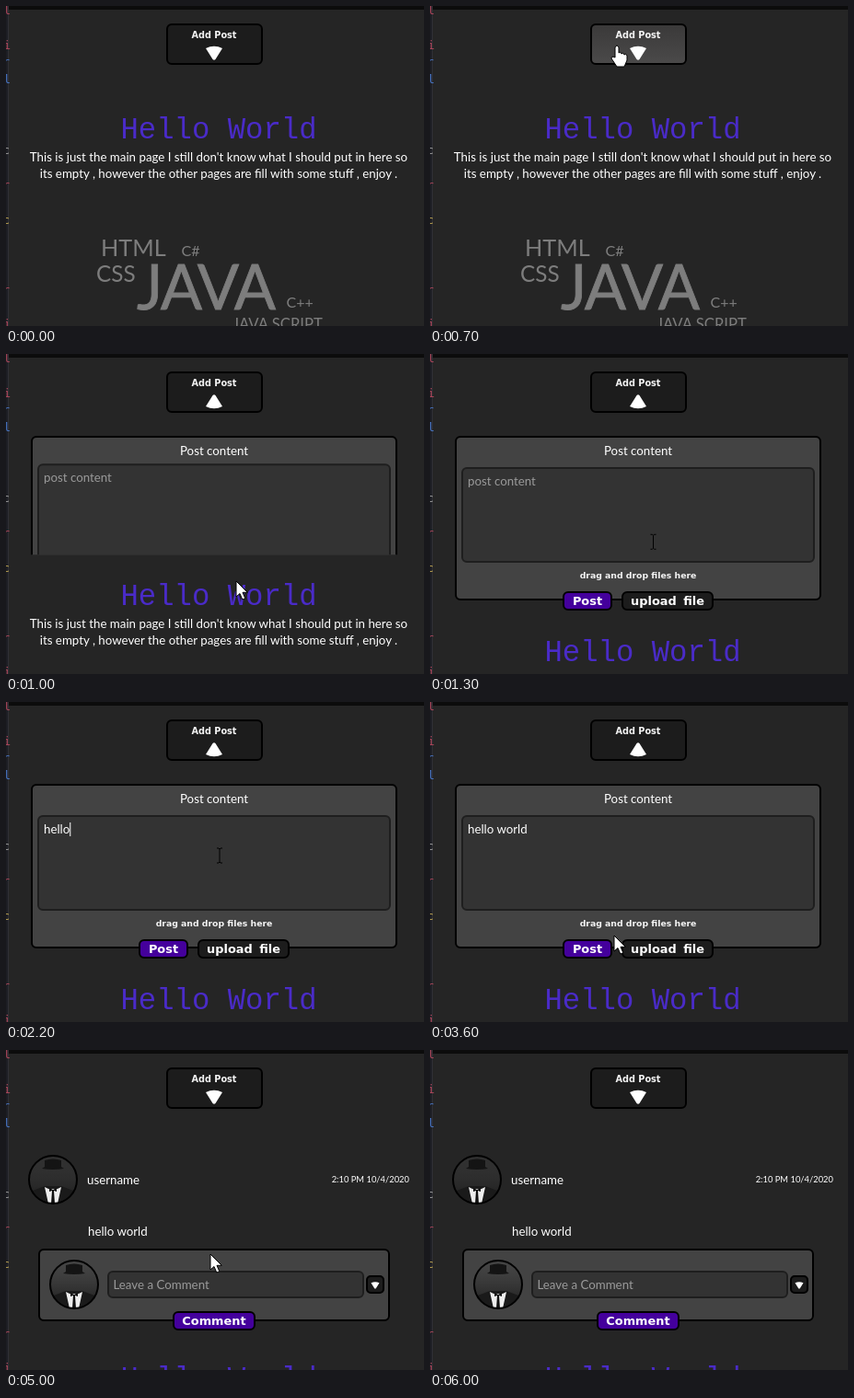
These frames come from a looping animation (454 px wide and 348 px high, 7 s). An HTML page:

```html
<!DOCTYPE html>
<html lang="en">
<head>
<meta charset="utf-8">
<title>Add Post</title>
<style>
  html, body { margin: 0; width: 100%; height: 100%; overflow: hidden; background: #252525; }
  svg { display: block; }
  text { white-space: pre; }
  .body { font: 13.3px Lato, sans-serif; fill: #fff; }
  .hint { fill: #9a9a9a; }
  .date { font-size: 9.4px; }
  .title { font: 32.3px "Liberation Mono", monospace; fill: #4a2bc8; }
  .label { font: bold 9.3px "DejaVu Sans", sans-serif; fill: #f4f4f4; }
  .button { font: bold 12.9px "DejaVu Sans", sans-serif; fill: #fff; word-spacing: 3px; }
  .cloud { font-family: Lato, sans-serif; fill: #7d7d7d; }
  .big { font-size: 67px; letter-spacing: -1.8px; stroke: #7d7d7d; stroke-width: .8px; }
  .code { font: 13px "DejaVu Sans Mono", monospace; }
  .mid { text-anchor: middle; }
  .end { text-anchor: end; }
  .box { stroke: #000; stroke-width: 2px; }
  .panel { fill: #434343; }
  .field { fill: #333; stroke: #1e1e1e; }
  .dark { fill: #1c1c1c; }
  .purple { fill: #44009c; }
  .purple.hover { fill: #5a14b8; }
  .dark.hover { fill: url(#glow); }
</style>
</head>
<body>
<svg width="454" height="348" viewBox="0 0 454 348">
  <defs>
    <linearGradient id="glow" x2="0" y2="1">
      <stop stop-color="#3a3939"/><stop offset="1" stop-color="#4b4a4a"/>
    </linearGradient>
    <linearGradient id="backdrop" x2="0" y2="1">
      <stop stop-color="#484848" stop-opacity=".3"/><stop offset="1" stop-color="#181818"/>
    </linearGradient>
    <clipPath id="reveal"><rect id="revealBox" x="20" y="80" width="420" height="9"/></clipPath>
    <clipPath id="round"><circle r="26"/></clipPath>
    <path id="wedge" d="M-9-5.5Q0-10 9-5.5L1.5 6.5Q0 8-1.5 6.5Z" fill="#fff"/>
    <g id="avatar">
      <g clip-path="url(#round)">
        <circle r="26" fill="url(#backdrop)"/>
        <path d="M-27 27V14L-9 7H9L27 14V27Z" fill="#1a1a1a"/>
        <path d="M-9-14V-21Q0-24 9-21V-14L12-12Q0-10-12-12Z" fill="#141414"/>
        <path d="M-9 8L-5 10H5L9 8L5 26H-5Z" fill="#eee"/>
        <path d="M-4 9L0 11L4 9V13L1 12L2 26H-2L-1 12L-4 13Z" fill="#111"/>
      </g>
      <circle r="26" fill="none" class="box"/>
    </g>
  </defs>

  <rect width="454" height="348" fill="#252525"/>

  <g id="page">
    <text class="title mid" x="231" y="144">Hello World</text>
    <g class="body mid">
      <text x="231" y="169">This is just the main page I still don't know what I should put in here so</text>
      <text x="231" y="187">its empty , however the other pages are fill with some stuff , enjoy .</text>
    </g>
    <g class="cloud">
      <text x="103" y="272" font-size="25.3">HTML</text>
      <text x="190.5" y="272" font-size="16.2">C#</text>
      <text x="98" y="300" font-size="24.3">CSS</text>
      <text x="142" y="330" class="big">JAVA</text>
      <text x="304.5" y="328" font-size="16">C++</text>
      <text x="246" y="352" font-size="16.7">JAVA SCRIPT</text>
    </g>
  </g>

  <g id="post">
    <use href="#avatar" x="51" y="141"/>
    <text class="body" x="88" y="146">username</text>
    <text class="body date end" x="438" y="144">2:10 PM 10/4/2020</text>
    <text class="body" x="89" y="202">hello world</text>
    <rect class="box panel" x="36" y="217" width="380" height="77" rx="5"/>
    <use href="#avatar" x="74" y="255"/>
    <rect class="box field" x="111" y="241" width="277" height="28" rx="5"/>
    <text class="body hint" x="116.5" y="260">Leave a Comment</text>
    <rect class="box dark" x="392" y="246" width="18" height="18" rx="4"/>
    <use href="#wedge" transform="translate(401 256) scale(.5)"/>
    <rect class="box purple" x="182" y="285" width="88" height="19" rx="5"/>
    <text class="button mid" x="226" y="299">Comment</text>
  </g>

  <g clip-path="url(#reveal)">
    <rect class="box panel" x="28" y="90" width="396" height="177" rx="5"/>
    <text class="body mid" x="226" y="110">Post content</text>
    <g id="form">
      <rect class="box field" x="35" y="124" width="382" height="102" rx="5"/>
      <text id="draft" class="body" x="41" y="143"></text>
      <rect id="caret" y="131" width="1" height="15" fill="#fff"/>
      <text class="label mid" x="226" y="244">drag and drop files here</text>
      <rect id="send" class="box purple" x="145" y="259" width="52" height="19" rx="5"/>
      <text class="button mid" x="171" y="273">Post</text>
      <rect class="box dark" x="209" y="259" width="98" height="19" rx="5"/>
      <text class="button mid" x="258" y="273">upload file</text>
    </g>
  </g>

  <rect id="toggle" class="box dark" x="175" y="20" width="103" height="43" rx="5"/>
  <text class="label mid" x="226" y="35" style="font-size:9.7px">Add Post</text>
  <use id="toggleArrow" href="#wedge"/>

  <rect width="454" height="4" fill="#0c0c0c"/>
  <rect width="2" height="348" fill="#1d1e24"/>
  <rect x="2" width="1" height="348" fill="#303036"/>
  <g class="code" text-anchor="end">
    <g fill="#b0485c">
      <text x="5" y="9">l</text><text x="5" y="47">i</text><text x="4" y="199">r</text>
      <text x="4" y="313">r</text><text x="5" y="350">i</text>
    </g>
    <g fill="#4a78c8"><text x="4" y="65">r</text><text x="5" y="84">l</text></g>
    <text x="4" y="161" fill="#9a9a9a">c</text>
    <text x="4" y="237" fill="#b8a050">c</text>
  </g>

  <g id="pointer">
    <path id="arrow" d="M0 0V17L4 13.5L6.8 20L9.8 18.7L7 12.3H12.3Z" fill="#fff" stroke="#000"/>
    <path id="hand" d="M-3 1Q-1-3 1 1V7Q3 5 4 8Q6 6 7 9Q9 7 10 10V15L7 22H-1L-7 13Q-7 10-3 12Z"
      fill="#fff" stroke="#000"/>
    <path id="beam" d="M-3-8H-1L0-7L1-8H3M0-7V7M-3 8H-1L0 7L1 8H3" fill="none" stroke="#000"/>
  </g>
</svg>
<script>
const LOOP = 7000, STEP = 100;
const OPEN_AT = 753, CLOSE_AT = 4050, SLIDE = 400;
const FORM_HEIGHT = 190, POST_HEIGHT = 223;

// Pointer path: time, x, y
const path = [
  [100, 330, 0], [600, 204, 44], [780, 204, 44], [1000, 250, 247], [1400, 240, 190],
  [1700, 232, 167], [3000, 232, 167], [3600, 200, 254], [3850, 176, 268], [4050, 176, 268],
  [4800, 229, 194], [5000, 222, 222], [5500, 182, 278], [5800, 182, 278], [6000, 430, 360]
];
const keyTimes = [1700, 1800, 1900, 2000, 2100, 2500, 2600, 2700, 2800, 2900, 3000];

const el = id => document.getElementById(id);
const swing = p => 0.5 - Math.cos(Math.PI * Math.min(1, Math.max(0, p))) / 2;
const shift = (id, x, y) => el(id).setAttribute("transform", `translate(${x} ${y})`);
const show = (id, on) => el(id).style.display = on ? "" : "none";

function pointerAt(t) {
  const i = path.findIndex(key => key[0] > t);
  if (i < 1) return null;
  const [t0, x0, y0] = path[i - 1], [t1, x1, y1] = path[i];
  const p = (t - t0) / (t1 - t0);
  return { x: x0 + (x1 - x0) * p, y: y0 + (y1 - y0) * p };
}

function drawPointer(t, isOpen, posted) {
  const at = pointerAt(t);
  const over = (x, y, w, h) =>
    !!at && at.x >= x && at.x <= x + w && at.y >= y && at.y <= y + h;
  const onToggle = over(174, 19, 105, 45);
  const onSend = isOpen && over(144, 258, 54, 21);
  const onField = isOpen && over(34, 123, 384, 104) || posted && over(110, 240, 279, 30);
  const onButton = onToggle || onSend;

  el("toggle").classList.toggle("hover", onToggle);
  el("send").classList.toggle("hover", onSend);
  show("pointer", at);
  show("hand", onButton);
  show("beam", onField);
  show("arrow", !onButton && !onField);
  if (at) shift("pointer", at.x, at.y);
}

function drawDraft(t) {
  const typed = keyTimes.filter(time => time <= t);
  const draft = el("draft");
  draft.textContent = "hello world".slice(0, typed.length) || "post content";
  draft.classList.toggle("hint", !typed.length);
  const sinceKey = t - (typed.at(-1) ?? 1600);
  show("caret", t >= 1600 && t < CLOSE_AT && sinceKey % 1000 < 500);
  el("caret").setAttribute("x", 41 + (typed.length ? draft.getComputedTextLength() : 0));
}

function draw(t) {
  const open = swing((t - OPEN_AT) / SLIDE) - swing((t - CLOSE_AT) / SLIDE);
  const isOpen = t >= OPEN_AT && t < CLOSE_AT;
  const posted = t >= CLOSE_AT;
  const offset = FORM_HEIGHT * open;

  el("revealBox").setAttribute("height", open > 0 ? 9 + offset : 0);
  shift("form", 0, -12 * (1 - open));
  shift("page", 0, offset + (posted ? POST_HEIGHT : 0));
  show("post", posted);
  shift("post", 0, offset);
  el("toggleArrow").setAttribute("transform",
    `translate(226 51.5) rotate(${isOpen ? 180 : 0})`);
  drawDraft(t);
  drawPointer(t, isOpen, posted);
}

const start = performance.now();
function frame() {
  const t = (performance.now() - start) % LOOP;
  draw(Math.floor(t / STEP) * STEP);
  requestAnimationFrame(frame);
}
frame();
</script>
</body>
</html>
```
